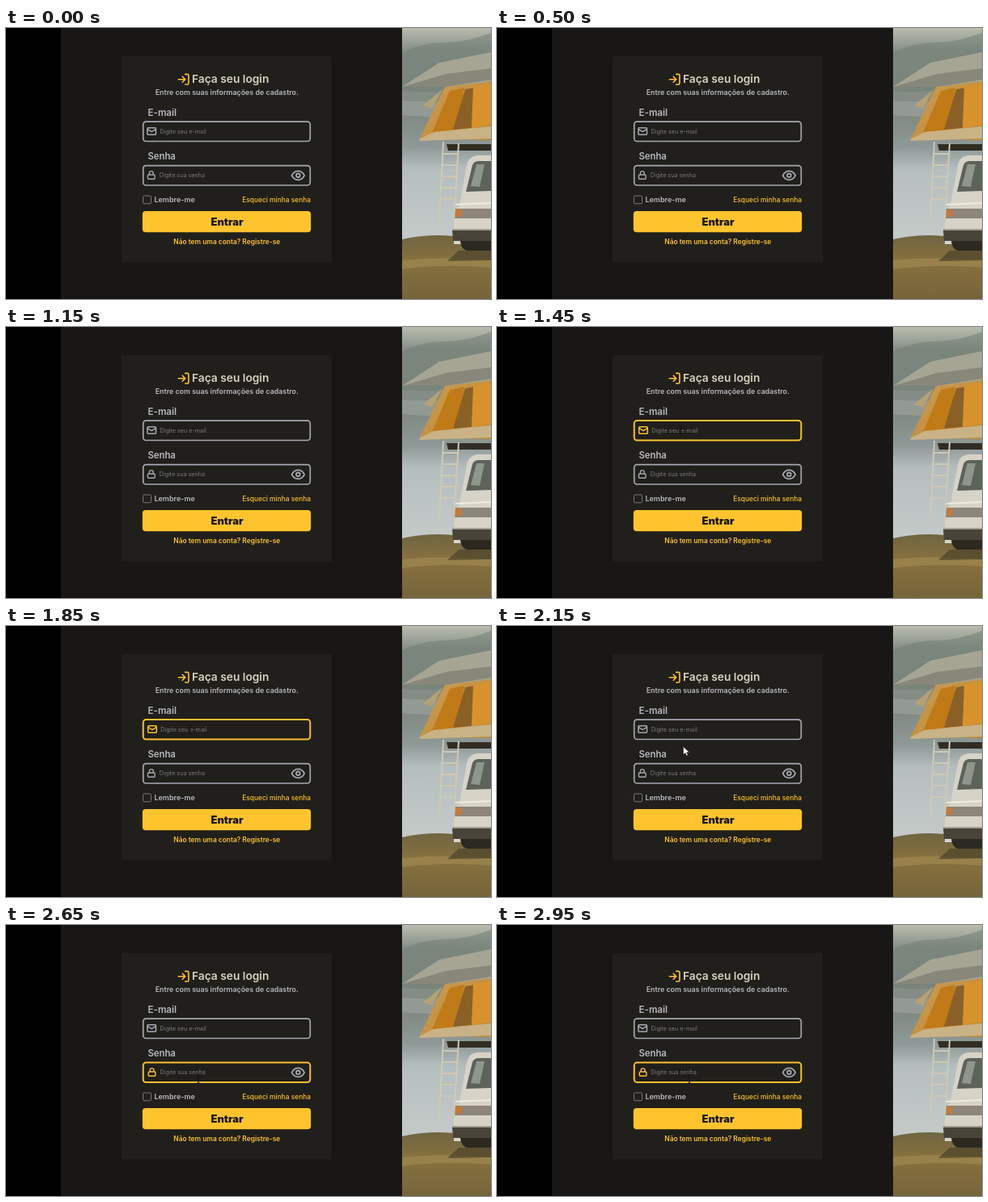
These frames come from a looping animation (600x336 px, 3 s). An HTML page:

```html
<!DOCTYPE html>
<html lang="pt-BR">
<head>
<meta charset="utf-8">
<title>Login</title>
<style>
html, body { margin: 0; width: 100%; height: 100%; overflow: hidden; background: #000; }
svg { display: block; width: 600px; height: 336px; }
text { font-family: Inter, "Open Sans", sans-serif; font-weight: 600; fill: #b9b8c0; }
.mid { text-anchor: middle; }
.gold { fill: #ffc42d; }
.line { fill: none; stroke-width: 2.3; stroke-linecap: round; stroke-linejoin: round; }
.field { color: #a6a7b1; }
.field rect, .field .line { stroke: currentColor; }
.field .box { fill: none; stroke-width: 1.7; }
.field .shift .line { stroke-width: 2.9; }
.field .hint { font-size: 7.2px; font-weight: 400; fill: #7b7b80; }
.field.on .own { color: #f9c032; }
.field.on .box { stroke-width: 2; }
.field.on .shift { transform: translateX(.8px); }
</style>
</head>
<body>
<svg viewBox="0 0 600 336">
  <defs>
    <linearGradient id="air" x2="0" y2="1">
      <stop offset="0" stop-color="#b9bcad"/>
      <stop offset=".08" stop-color="#87918a"/>
      <stop offset=".33" stop-color="#818b83"/>
      <stop offset=".44" stop-color="#8f9997"/>
      <stop offset=".52" stop-color="#b5bebf"/>
      <stop offset=".76" stop-color="#c3c9c7"/>
    </linearGradient>
    <linearGradient id="grass" x2="0" y2="1">
      <stop offset="0" stop-color="#6f6541"/>
      <stop offset=".4" stop-color="#88713f"/>
      <stop offset="1" stop-color="#76643a"/>
    </linearGradient>
    <linearGradient id="canvas" x2="1" y2="1">
      <stop offset="0" stop-color="#c99d57"/>
      <stop offset="1" stop-color="#c08834"/>
    </linearGradient>
  </defs>

  <rect width="600" height="336"/>
  <rect x="68" width="422" height="336" fill="#181715"/>
  <rect x="143" y="35" width="260" height="255.500" fill="#201f1b"/>

  <g id="photo">
    <rect x="490" width="110" height="336" fill="url(#air)"/>
    <path d="M490 30q25-12 52-12t58-12v66q-60 10-110 6z" fill="#717d72" opacity=".5"/>
    <path d="M490 90q50 4 110-2v20q-60 4-110 0z" fill="#a3aaa3" opacity=".5"/>
    <path d="M490 262q30-7 63-4l47 3v75H490z" fill="url(#grass)"/>
    <path d="M490 288q50-5 110 0v9q-60-5-110 2z" fill="#a58d52" opacity=".6"/>
    <path d="M560 276h40v12l-54 1z" fill="#4a4229" opacity=".7"/>
    <path d="M512 137l32-66 56-10v78z" fill="url(#canvas)"/>
    <path d="M527 130l22-52 18-4-9 52z" fill="#c07a18"/>
    <path d="M553 126l15-50 12-2-4 50z" fill="#8b6027"/>
    <path d="M578 73l22-4v51l-24 4z" fill="#d8922b"/>
    <path d="M516 96l24-20-13 24z" fill="#b5a175"/>
    <path d="M490 73l46-30 64-13v36l-56 7z" fill="#a6a594"/>
    <path d="M490 73l54-16 56-7v14l-56 9z" fill="#87877a"/>
    <path d="M511 138l18-9 71-7v15l-88 3z" fill="#c9b285"/>
    <path d="M545 144h55v8h-53z" fill="#312d25"/>
    <path d="M561 219l9-48q2-12 13-13h17v110h-46v-36q0-9 7-11z" fill="#d7d3c7"/>
    <path d="M569 203l8-33q2-5 8-5h15v37z" fill="#5d625b"/>
    <path d="M575 196l7-27h10l-6 28z" fill="#8f968c"/>
    <path d="M554 219l46-2" stroke="#efebdf" stroke-width="2"/>
    <path d="M555 224h45v12h-45z" fill="#8b857a"/>
    <path d="M556 225h8v9h-8z" fill="#c27a3e"/>
    <path d="M552 250h48v14h-47z" fill="#48443a"/>
    <path d="M552 250h48" stroke="#a5a193" stroke-width="2"/>
    <path d="M562 264h38v12h-30q-7-2-8-12z" fill="#2b2920"/>
    <path d="M541 141l-5 98M560 143l-6 96M540 156h19M539 170h19M538 184h19M537 198h19M537 212h18" fill="none" stroke="#cfc8b3" stroke-width="2"/>
  </g>

  <path class="line" stroke="#ffc42d" transform="translate(211.200 55.300) scale(.7)" d="M15 3h4a2 2 0 0 1 2 2v14a2 2 0 0 1-2 2h-4M10 17l5-5-5-5M15 12H3"/>
  <text x="230" y="68.300" font-size="13.750" style="fill:#d8d1bd">Faça seu login</text>
  <text class="mid" x="273.300" y="83.300" font-size="8.850">Entre com suas informações de cadastro.</text>

  <text x="175.500" y="108.700" font-size="11.600">E-mail</text>
  <g class="field" id="mail">
    <g class="own">
      <rect class="box" x="169.700" y="116.100" width="206.600" height="24.400" rx="3.500"/>
      <g class="shift"><path class="line" transform="translate(173.800 121.700) scale(.53)" d="M4 4h16a2 2 0 0 1 2 2v12a2 2 0 0 1-2 2H4a2 2 0 0 1-2-2V6a2 2 0 0 1 2-2zM22 7l-10 6L2 7"/></g>
    </g>
    <text class="hint shift" x="190.500" y="130.600">Digite seu e-mail</text>
  </g>

  <text x="175.500" y="163.200" font-size="11.300">Senha</text>
  <g class="field" id="pass">
    <g class="own">
      <rect class="box" x="169.700" y="170.600" width="206.600" height="24.400" rx="3.500"/>
      <g class="shift"><path class="line" transform="translate(174 176.700) scale(.48)" d="M5 11h14a2 2 0 0 1 2 2v7a2 2 0 0 1-2 2H5a2 2 0 0 1-2-2v-7a2 2 0 0 1 2-2zM7 11V7a5 5 0 0 1 10 0v4"/></g>
    </g>
    <text class="hint shift" x="189.800" y="185.100">Digite sua senha</text>
    <g class="line" transform="translate(352 173.500) scale(.78)">
      <path d="M2 12s3.600-7 10-7 10 7 10 7-3.600 7-10 7-10-7-10-7z"/>
      <circle cx="12" cy="12" r="3"/>
    </g>
  </g>

  <rect x="169.500" y="208" width="10" height="9.800" rx="1.500" fill="none" stroke="#77777c"/>
  <text x="183.400" y="216.300" font-size="9">Lembre-me</text>
  <text class="gold" x="377" y="216" font-size="8.400" text-anchor="end" style="font-weight:500">Esqueci minha senha</text>
  <rect class="gold" x="168.800" y="227" width="208.400" height="26.200" rx="4"/>
  <text class="mid" x="273.500" y="244.800" font-size="12.900" style="font-weight:900;fill:#1b1913">Entrar</text>
  <text class="mid gold" x="273.300" y="267.800" font-size="8.400">Não tem uma conta? Registre-se</text>

  <g id="cursor">
    <path id="beam" d="M-1.500-5h3M0-5V5M-1.500 5h3" fill="none" stroke="#111"/>
    <path id="arrow" d="M0 0v10l2.400-2.200 1.600 3.600 1.700-.8-1.600-3.400h3.300z" fill="#fff" stroke="#111" stroke-width=".5"/>
  </g>
</svg>
<script>
const LOOP = 3000, STEP = 50;
// Pointer path: time, x, y
const path = [[1200, 228, 128], [1950, 228, 128], [2350, 233, 171], [2600, 238, 191], [LOOP, 238, 191]];
const el = id => document.getElementById(id);
const [mail, pass, cursor, beam, arrow] = ['mail', 'pass', 'cursor', 'beam', 'arrow'].map(el);
const show = (node, on) => node.setAttribute('visibility', on ? 'visible' : 'hidden');

function pointerAt(t) {
  const i = path.findIndex(p => p[0] > t);
  if (i < 1) return null;
  const [t0, x0, y0] = path[i - 1], [t1, x1, y1] = path[i];
  const k = (t - t0) / (t1 - t0);
  return { x: x0 + (x1 - x0) * k, y: y0 + (y1 - y0) * k };
}

function draw(now) {
  const p = pointerAt(Math.floor(now % LOOP / STEP) * STEP);
  const inMail = !!p && p.y > 115 && p.y < 141;
  const inPass = !!p && p.y > 172 && p.y < 196;
  mail.classList.toggle('on', inMail);
  pass.classList.toggle('on', inPass);
  show(beam, inMail || inPass);
  show(arrow, p && !inMail && !inPass);
  if (p) cursor.setAttribute('transform', `translate(${p.x} ${p.y})`);
  requestAnimationFrame(draw);
}
requestAnimationFrame(draw);
</script>
</body>
</html>
```
